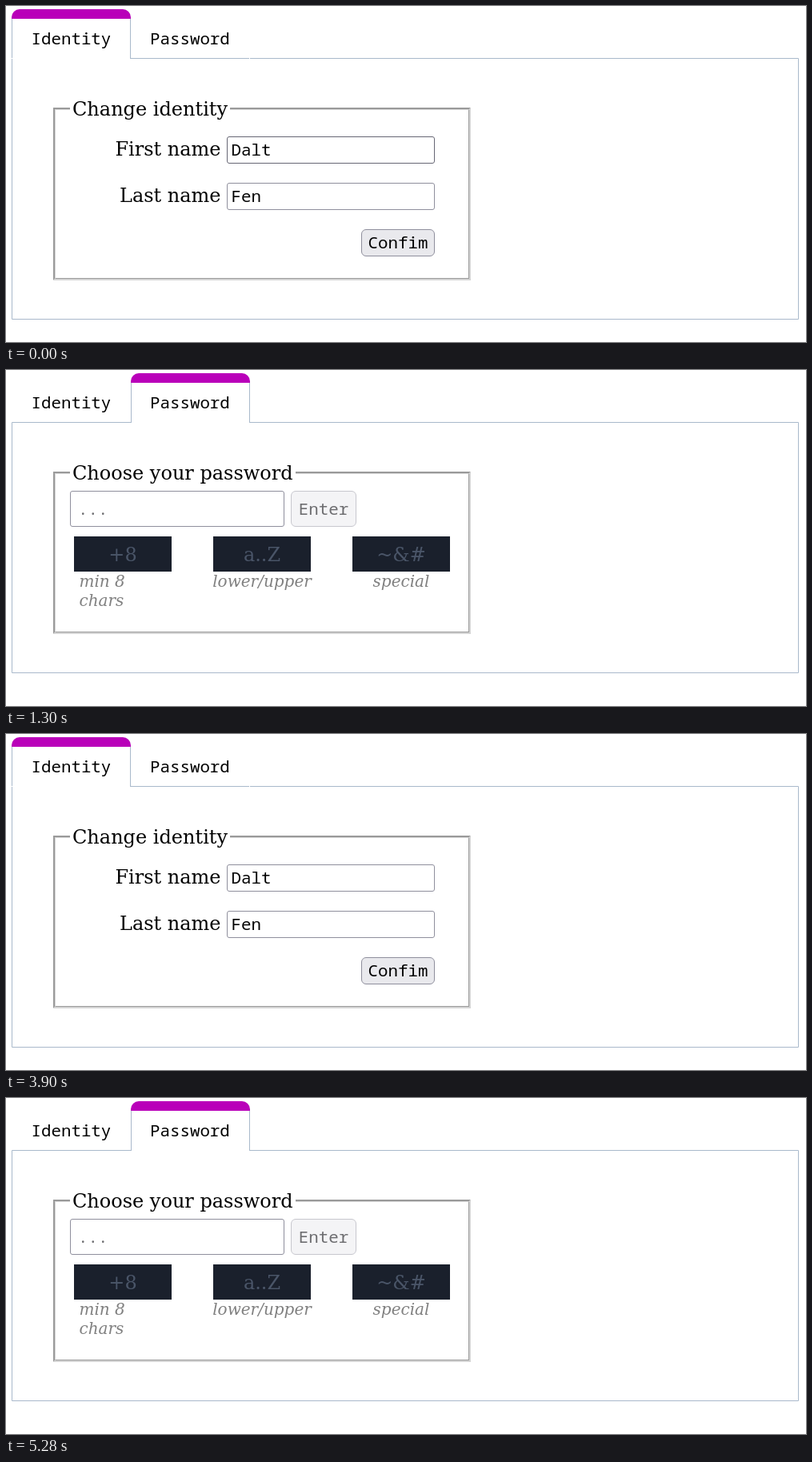
Recreate the animation shown at these times as an HTML page. Size 1000x420 px, loop 5.8 s.

```html
<!DOCTYPE html>
<html lang="en">
<head>
<meta charset="utf-8">
<title>Tabs</title>
<style>
  html, body { margin: 0; width: 100%; height: 100%; overflow: hidden; background: #fff; }
  svg { display: block; width: 1000px; height: 420px; }
  text { font: 24px "DejaVu Serif", serif; }
  .mono text, text.mono { font: 20.8px "Noto Sans Mono", monospace; }
  .end { text-anchor: end; }
  .mid { text-anchor: middle; }
  .line { fill: none; stroke: #a9b9cb; }
  .tab { fill: #b900b9; }
  .box { fill: #fff; stroke: #8f8f9d; }
  .button { fill: #e9e9ed; stroke: #8f8f9d; }
  .off { fill: #f4f4f6; stroke: #c7c7ce; }
  .dark { fill: #9a9a9a; }
  .light { fill: #d5d5d5; }
  .rules rect { fill: #1a202c; }
  .rules text { fill: #4a5568; }
  .hints text { font-size: 20px; font-style: italic; fill: #808080; }
  .identity { animation: identity 5.8s step-end infinite; }
  .password { animation: password 5.8s step-end infinite; }
  .hover { animation: hover 5.8s step-end infinite; }
  @keyframes identity {
    0%, 51.7241% { opacity: 1; }
    22.4138%, 77.5862%, 100% { opacity: 0; }
  }
  @keyframes password {
    0%, 51.7241% { opacity: 0; }
    22.4138%, 77.5862%, 100% { opacity: 1; }
  }
  @keyframes hover {
    0% { stroke: #676774; }
    8.6207%, 100% { stroke: #8f8f9d; }
  }
</style>
</head>
<body>
<svg viewBox="0 0 1000 420">
  <defs>
    <g id="tab">
      <path class="tab" d="M0 16v-2a10 10 0 0 1 10-10h129a10 10 0 0 1 10 10v2z"/>
      <path class="line" d="M.5 16v49M148.5 16v50"/>
    </g>
  </defs>

  <g class="identity">
    <use href="#tab" x="7"/>
    <path class="line" d="M156 65.5H304M305 65.5H990.5V391.5H7.5V66"/>
    <path class="dark" d="M59 127H581L579 129H61V341L59 343z"/>
    <path class="light" d="M581 127V343H59L61 341H579V129z"/>
    <path class="light" d="M61 129H579L578 130H62V340L61 341z"/>
    <path class="dark" d="M579 129V341H61L62 340H578V130z"/>
    <rect x="80" y="126" width="200" height="5" fill="#fff"/>
    <text x="83" y="137">Change identity</text>
    <text class="end" x="268.5" y="187">First name</text>
    <text class="end" x="268.5" y="245">Last name</text>
    <rect class="box hover" x="276.5" y="163.5" width="259" height="33" rx="2.5"/>
    <rect class="box" x="276.5" y="221.5" width="259" height="33" rx="2.5"/>
    <rect class="button" x="444.5" y="279.5" width="91" height="33" rx="5.5"/>
    <g class="mono">
      <text x="281.5" y="187">Dalt</text>
      <text x="281.5" y="245">Fen</text>
      <text class="mid" x="490" y="303">Confim</text>
    </g>
  </g>

  <g class="password">
    <use href="#tab" x="156"/>
    <path class="line" d="M157 65.5H7.5V378.5H990.5V65.5H304"/>
    <path class="dark" d="M59 127H581L579 129H61V328L59 330z"/>
    <path class="light" d="M581 127V330H59L61 328H579V129z"/>
    <path class="light" d="M61 129H579L578 130H62V327L61 328z"/>
    <path class="dark" d="M579 129V328H61L62 327H578V130z"/>
    <rect x="80" y="126" width="282" height="5" fill="#fff"/>
    <text x="83" y="137">Choose your password</text>
    <rect class="box" x="80.5" y="151.5" width="267" height="44" rx="2.5"/>
    <rect class="off" x="356.5" y="151.5" width="81" height="44" rx="5.5"/>
    <g class="mono" fill="#6d6d70">
      <text x="90" y="181">...</text>
      <text class="mid" x="397" y="181">Enter</text>
    </g>
    <g class="rules mid">
      <rect x="85" y="208" width="122" height="44"/>
      <rect x="259" y="208" width="122" height="44"/>
      <rect x="433" y="208" width="122" height="44"/>
      <text x="146" y="239">+8</text>
      <text x="320" y="239">a..Z</text>
      <text x="494" y="239">~&amp;#</text>
    </g>
    <g class="hints">
      <text x="91.5" y="271">min 8</text>
      <text x="91.5" y="295">chars</text>
      <text class="mid" x="320" y="271">lower/upper</text>
      <text class="mid" x="494" y="271">special</text>
    </g>
  </g>

  <g class="mono">
    <text x="31.5" y="48">Identity</text>
    <text x="180" y="48">Password</text>
  </g>
</svg>
</body>
</html>
```
